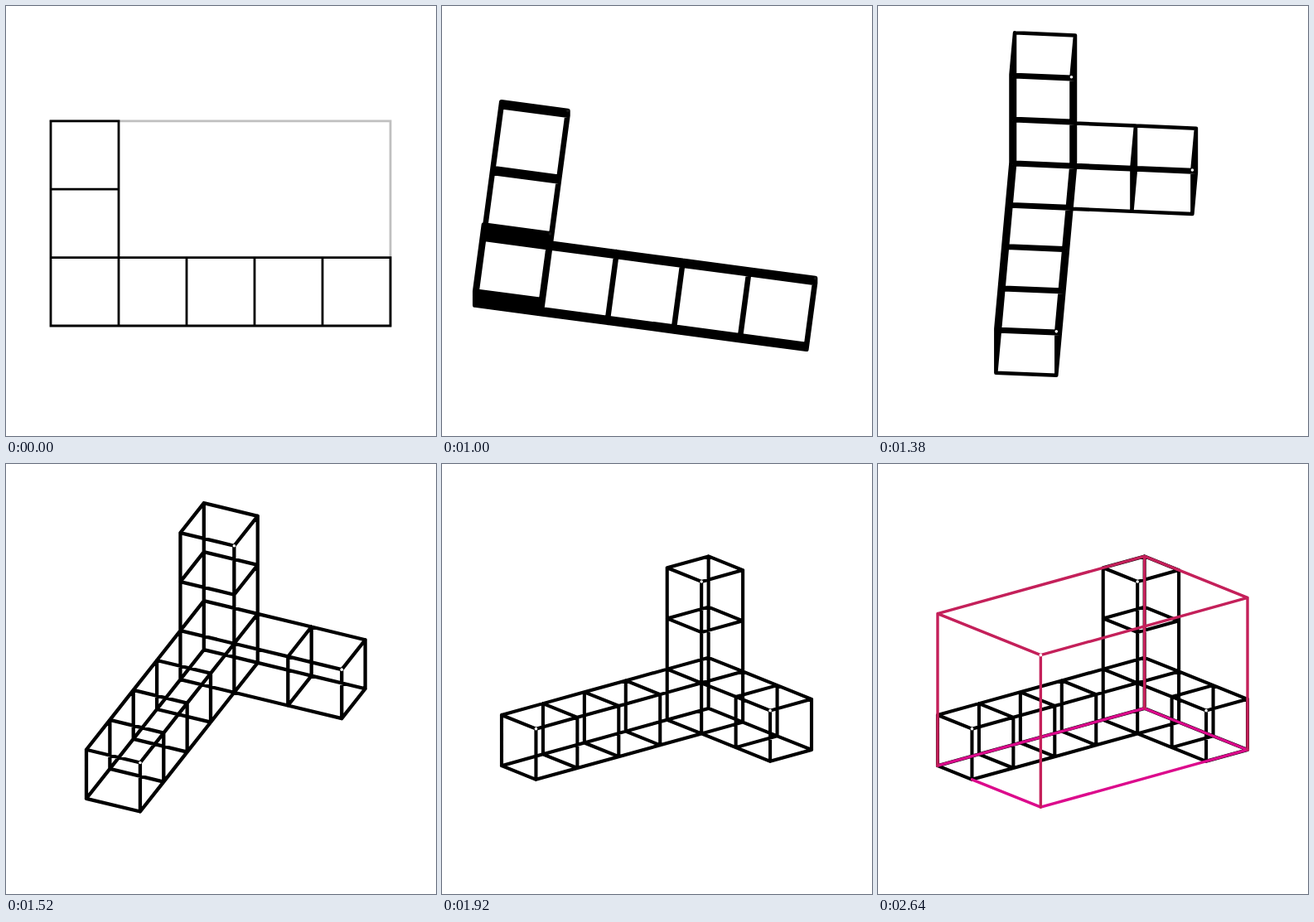
An HTML page for the animation above (4 s loop, 519x519 px).

```html
<!DOCTYPE html>
<html lang="en">
<head>
<meta charset="utf-8">
<title>Cubes along three axes</title>
<style>
  html, body { margin: 0; width: 100%; height: 100%; overflow: hidden; background: #fff; }
  svg { display: block; width: 100vw; height: 100vh; }
  path { fill: none; stroke: #000; stroke-linecap: round; stroke-linejoin: round; }
  .flat path { stroke-width: 2.8; stroke-linejoin: miter; }
</style>
</head>
<body>
<svg viewBox="0 0 519 519">
  <g class="flat" id="flat">
    <path id="outline" style="stroke:#c0c0c0"/>
    <path id="plan"/>
  </g>
  <g id="solid">
    <path id="cubes"/>
    <g id="box" stroke-width="3.4">
      <path id="base" style="stroke:#dc0a8c"/>
      <path id="frame" style="stroke:#c4205a"/>
    </g>
    <g id="dots" fill="#fff"></g>
  </g>
</svg>
<script>
const LOOP = 4000, STEP = 20;
const SIZE = [5, 3, 3];
const $ = id => document.getElementById(id);
const clamp = v => Math.max(0, Math.min(1, v));

// time, yaw, pitch, unit length, centre x, centre y, line width
const KEYS = [
  [900, 0, 90, 82.1, 259, 262.3, 5.9],
  [1000, 7.6, 86, 80.7, 255.8, 259.4, 5.8],
  [1240, 67.5, 56.4, 75.6, 260, 239.8, 4.8],
  [1520, 113.6, 33.6, 70.85, 265.3, 249, 4.3],
  [1920, 140.3, 19.5, 64.9, 259, 262.8, 4.1]
];

function tangent(i, c) {
  if (i === 0 || i === KEYS.length - 1) return 0;
  const [a, b, d] = [KEYS[i - 1], KEYS[i], KEYS[i + 1]];
  const h = b[0] - a[0], k = d[0] - b[0];
  return ((b[c] - a[c]) / h * k + (d[c] - b[c]) / k * h) / (h + k);
}

// Smooth cubic interpolation of every column
function poseAt(t) {
  t = Math.max(KEYS[0][0], Math.min(KEYS[KEYS.length - 1][0], t));
  let i = 0;
  while (i < KEYS.length - 2 && t > KEYS[i + 1][0]) i++;
  const a = KEYS[i], b = KEYS[i + 1], h = b[0] - a[0];
  const u = (t - a[0]) / h, v = 1 - u;
  const [yaw, pitch, unit, cx, cy, width] = [1, 2, 3, 4, 5, 6].map(c =>
    a[c] * v * v * (1 + 2 * u) + b[c] * u * u * (3 - 2 * u) +
    h * u * v * (v * tangent(i, c) - u * tangent(i + 1, c)));
  return { yaw, pitch, unit, cx, cy, width };
}

function projector({ yaw, pitch, unit, cx, cy }) {
  const r = Math.PI / 180;
  const c = Math.cos(yaw * r), n = Math.sin(yaw * r);
  const up = Math.cos(pitch * r), tilt = Math.sin(pitch * r);
  return p => {
    const [x, y, z] = p.map((v, i) => v - SIZE[i] / 2);
    return [cx + unit * (x * c + z * n), cy + unit * ((x * n - z * c) * tilt - y * up)];
  };
}

// Edges of a block, each as a pair of corners
function blockEdges(o, d) {
  const list = [];
  for (let axis = 0; axis < 3; axis++)
    for (let k = 0; k < 4; k++) {
      const a = o.slice(), j = (axis + 1) % 3, l = (axis + 2) % 3;
      if (k & 1) a[j] += d[j];
      if (k & 2) a[l] += d[l];
      const b = a.slice();
      b[axis] += d[axis];
      list.push([a, b]);
    }
  return list;
}

const unique = new Map();
SIZE.forEach((n, axis) => {
  for (let k = 0; k < n; k++) {
    const o = [0, 0, 0];
    o[axis] = k;
    for (const e of blockEdges(o, [1, 1, 1])) unique.set(e.join(), e);
  }
});
const cubeEdges = [...unique.values()];

const boxEdges = blockEdges([0, 0, 0], SIZE);
const isBase = ([a, b]) => a[1] === 0 && b[1] === 0;
const frameEdges = boxEdges.filter(e => !isBase(e));
// The near end of the long arm stays black along the floor
const baseEdges = boxEdges.filter(isBase).map(([a, b]) =>
  a[0] === 5 && b[0] === 5 ? [[5, 0, 1], b] : [a, b]);

const nearCorners = [[5, 1, 1], [1, 3, 1], [1, 1, 3], [5, 3, 3]];
const dots = nearCorners.map(() => {
  const dot = document.createElementNS("http://www.w3.org/2000/svg", "circle");
  dot.setAttribute("r", 1.8);
  return $("dots").appendChild(dot);
});

const point = p => p.map(v => v.toFixed(2)).join(" ");
function drawEdges(id, edges, project) {
  $(id).setAttribute("d", edges.map(([a, b]) =>
    "M" + point(project(a)) + "L" + point(project(b))).join(""));
}

function drawPlan() {
  const cell = (i, j) => `M${54 + 82 * i} ${386 - 82.4 * j}h82v-82.4h-82z`;
  let d = "";
  for (let i = 0; i < 5; i++) d += cell(i, 0);
  for (let j = 1; j < 3; j++) d += cell(0, j);
  $("plan").setAttribute("d", d);
  $("outline").setAttribute("d", "M54 138.8H464V386");
}

function render(time) {
  const t = Math.floor(time % LOOP / STEP) * STEP;
  const fade = clamp((t - 640) / 240), tint = clamp((t - 2400) / 240);
  const pose = poseAt(t), project = projector(pose);

  $("flat").style.display = fade < 1 ? "" : "none";
  $("outline").style.opacity = 1 - fade;
  $("solid").style.opacity = fade;
  $("box").style.opacity = tint;

  $("cubes").setAttribute("stroke-width", pose.width);
  drawEdges("cubes", cubeEdges, project);
  drawEdges("base", baseEdges, project);
  drawEdges("frame", frameEdges, project);

  const shine = clamp((90 - pose.pitch) / 45);
  dots.forEach((dot, i) => {
    const [x, y] = project(nearCorners[i]);
    dot.setAttribute("cx", x);
    dot.setAttribute("cy", y);
    dot.style.opacity = i === 3 ? tint : shine;
  });
}

drawPlan();
const start = performance.now();
function tick() {
  render(performance.now() - start);
  requestAnimationFrame(tick);
}
tick();
</script>
</body>
</html>
```
